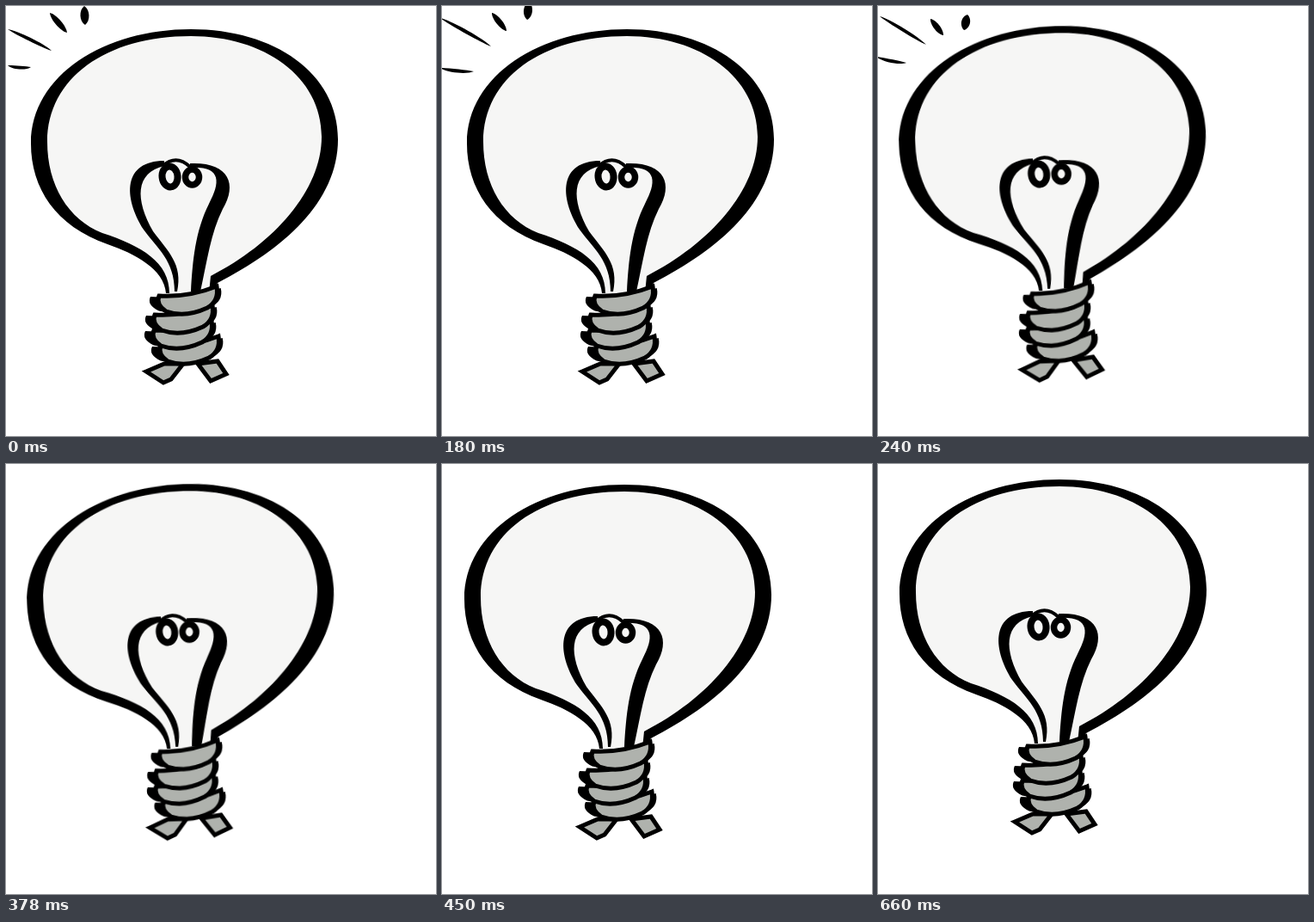
Write an HTML page that moves like this. It is 500 px wide and 500 px high and loops after 0.78 s.

```html
<!DOCTYPE html>
<html lang="en">
<head>
<meta charset="utf-8">
<title>Light bulb</title>
<style>
html, body { margin: 0; width: 100%; height: 100%; overflow: hidden; background: #fff; }
svg { display: block; width: 100vw; height: 100vh; }
.glass { fill: #f6f6f5; }
.metal { fill: #afb2ad; stroke: #000; stroke-width: 5; }
.wire { fill: none; stroke: #000; }
#bulb, .rays { animation: sway 780ms step-end infinite; }
.rays { visibility: hidden; }
#near { animation-name: near; }
#mid { animation-name: mid; }
#far { animation-name: far; }
@keyframes sway {
  0% { transform: none; }
  30.769% { transform: translate(105px, 295px) rotate(-1.95deg) translate(-105px, -295px); }
  57.692% { transform: translate(-3px, -3px); }
  84.615%, 100% { transform: translate(-4px, -9px); }
}
@keyframes near {
  0% { visibility: visible; }
  23.077%, 100% { visibility: hidden; }
}
@keyframes mid {
  0% { visibility: hidden; }
  23.077% { visibility: visible; }
  30.769%, 100% { visibility: hidden; }
}
@keyframes far {
  0% { visibility: hidden; }
  30.769% { visibility: visible; }
  34.615%, 100% { visibility: hidden; }
}
</style>
</head>
<body>
<svg viewBox="0 0 500 500" xmlns="http://www.w3.org/2000/svg">
  <defs>
    <path id="coil" d="M0,12 Q34,14 67,1 Q70,18 56,26 Q30,38 8,30 Q-4,22 0,12Z"/>
  </defs>
  <path id="near" class="rays"/>
  <path id="mid" class="rays"/>
  <path id="far" class="rays"/>
  <g id="bulb">
    <!-- glass: outer and inner edge -->
    <path d="M215,27 C312,27 386,78 386,155 C386,228 322,283 246,322 L240,334 H186
      C184,306 150,288 118,277 C58,256 29,212 29,160 C29,80 115,27 215,27Z"/>
    <path class="glass" d="M215,35 C300,35 367,82 367,152 C367,214 312,276 238,314 L236,334 H190
      C190,298 158,279 112,264 C72,248 48,208 48,158 C48,84 116,35 215,35Z"/>
    <!-- filament -->
    <path d="M184,180 C136,180 136,222 160,260 C176,282 196,296 196,332 H199
      C206,300 188,285 171,262 C150,225 150,194 184,186Z"/>
    <path d="M214,183 C258,181 270,206 252,236 C238,264 234,296 226,332 H215
      C217,296 220,262 236,230 C250,204 250,186 214,188Z"/>
    <path class="wire" stroke-width="4" d="M182,186 Q198,172 214,187"/>
    <ellipse class="wire" stroke-width="8" cx="190.5" cy="198.5" rx="9" ry="12" transform="rotate(-6 190 198)"/>
    <ellipse class="wire" stroke-width="7.5" cx="216.5" cy="199" rx="8" ry="9"/>
    <!-- feet and screw base -->
    <path class="metal" d="M163,425 L184,416 H206 L192,434 L183,438Z"/>
    <path class="metal" d="M223,416 L246,413 L256,428 L238,436Z"/>
    <g id="base"></g>
  </g>
</svg>
<script>
const RAYS = [
  { width: 4, bow: 1 }, { width: 7, bow: 0 }, { width: 10, bow: 0 }, { width: 4, bow: -2 }
];
// Start and end of each ray, per burst.
const BURSTS = {
  near: [[2, 27, 53, 52], [51, 8, 71, 31], [91, 0, 92, 22], [2, 69, 29, 71]],
  mid: [[-2, 14, 57, 47], [58, 8, 75, 29], [101, -5, 99, 16], [-2, 72, 37, 76]],
  far: [[2, 12, 56, 45], [61, 15, 76, 34], [104, 10, 100, 28], [-2, 59, 33, 66]]
};

// Thin lens from one end to the other, bent sideways by bow.
function lens([x1, y1, x2, y2], { width, bow }) {
  const dx = x2 - x1, dy = y2 - y1, len = Math.hypot(dx, dy);
  const at = (t, side) => [x1 + dx * t + dy / len * side, y1 + dy * t - dx / len * side];
  const a = bow + width / 1.5, b = bow - width / 1.5;
  return `M${x1},${y1} C${at(.2, a)} ${at(.8, a)} ${x2},${y2} C${at(.8, b)} ${at(.2, b)} ${x1},${y1}Z`;
}

for (const id in BURSTS) {
  const d = BURSTS[id].map((ends, i) => lens(ends, RAYS[i])).join('');
  document.getElementById(id).setAttribute('d', d);
}

// Shadows first, then the coils from the bottom up so each overlaps the next.
const coils = [[180, 383], [172, 365], [173, 347], [178, 325]];
const use = (cls, move) => `<use href="#coil" class="${cls}" transform="${move}"/>`;
document.getElementById('base').innerHTML =
  coils.map(([x, y]) => use('', `translate(${x - 10} ${y + 2}) scale(1.22 .92)`)).join('') +
  coils.map(([x, y]) => use('metal', `translate(${x} ${y})`)).join('');
</script>
</body>
</html>
```
